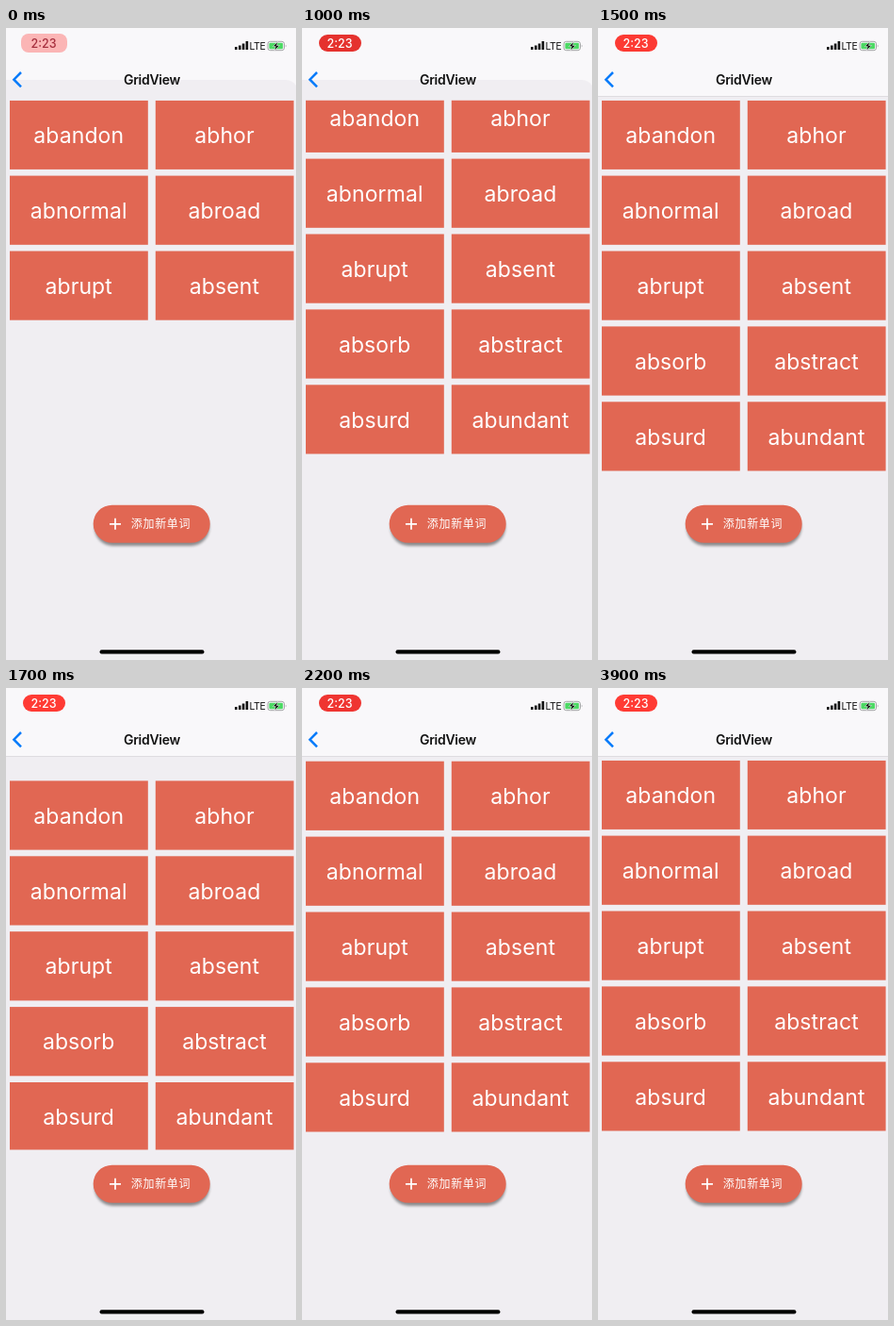
An HTML page for the animation above (4 s loop, 308 px wide and 670 px high).

```html
<!DOCTYPE html>
<html lang="zh">
<head>
<meta charset="utf-8">
<title>GridView</title>
<style>
html, body { margin: 0; width: 100%; height: 100%; overflow: hidden; background: #f0eef2; }
svg { display: block; width: 308px; height: 670px; font-family: Inter, "Noto Sans CJK SC", "Noto Sans CJK", sans-serif; }
text { text-anchor: middle; }
.card rect { fill: #e16753; }
.card text { fill: #fff; font-size: 23px; letter-spacing: .1px; }
.title { font-size: 14px; font-weight: 600; letter-spacing: -.25px; fill: #111; }
.add { font: 500 12px "Noto Sans CJK SC", "Noto Sans CJK", sans-serif; letter-spacing: .7px; fill: #fff; }
</style>
</head>
<body>
<svg viewBox="0 0 308 670">
  <defs>
    <clipPath id="view"><rect y="76.7" width="308" height="412.8"/></clipPath>
    <filter id="soft" x="-20%" y="-30%" width="140%" height="180%"><feGaussianBlur stdDeviation="1.8"/></filter>
  </defs>
  <rect width="308" height="670" fill="#f0eef2"/>
  <path id="bar" fill="#f9f8fa"/>
  <rect id="rule" y="72" width="308" height="1" fill="#dedce0"/>

  <rect id="pill"/>
  <text id="clock" x="40" y="20.5" font-size="12.5" font-weight="500">2:23</text>
  <path d="M243 20h2.6v3h-2.6zM247 18.4h2.6v4.6h-2.6zM250.8 16.4h2.6v6.6h-2.6zM254.6 14h2.6v9h-2.6z" fill="#111"/>
  <text x="267" y="22.8" font-size="10.5" letter-spacing="-.3" fill="#111">LTE</text>
  <rect x="278" y="14.3" width="17.5" height="9.4" rx="2.6" fill="none" stroke="#9b9b9d" stroke-width=".9"/>
  <rect x="279.4" y="15.7" width="14.7" height="6.6" rx="1.4" fill="#4cd964"/>
  <path d="M296.8 17.4q1.8 1.6 0 3.2z" fill="#9b9b9d"/>
  <path d="M288.6 14.4l-5.2 5.2h2.9l-1.2 4.4 5.4-5.5h-3z" fill="#111" stroke="#fff" stroke-width=".5"/>

  <path d="M16 47l-7.6 7.7 7.6 7.7" fill="none" stroke="#087bfa" stroke-width="2.5"/>
  <text class="title" x="155" y="59.5">GridView</text>

  <g clip-path="url(#view)"><g id="list"></g></g>

  <rect x="94" y="510" width="122" height="39" rx="19.5" fill="#000" opacity=".42" filter="url(#soft)"/>
  <rect id="button" x="92.7" y="505.7" width="124" height="40" rx="20"/>
  <path d="M110 525.8h12M116 519.8v12" stroke="#fff" stroke-width="1.7"/>
  <text class="add" x="164.5" y="530.2">添加新单词</text>
  <rect x="99.5" y="659.3" width="111" height="4.2" rx="2.1" fill="#000"/>
</svg>
<script>
const LOOP = 4000, STEP = 100;
const words = ["abandon", "abhor", "abnormal", "abroad", "abrupt",
  "absent", "absorb", "abstract", "absurd", "abundant"];
const flips = [
  { card: 4, text: "突然的", from: 2600, to: 3200 },
  { card: 3, text: "在国外", from: 3400, to: 3800 }
];
const presses = [[100, 300], [600, 800]];
const rowTimes = [0, 0, 0, 300, 800];
const scroll = [[900, 0], [1000, -18], [1100, -47], [1200, -65], [1300, -58], [1400, -28],
  [1500, 0], [1600, 15], [1700, 21.7], [1800, 18], [1900, 10], [2000, 5], [2200, 1], [2400, 0]];

const $ = id => document.getElementById(id);
const set = (el, attrs) => {
  for (const key in attrs) el.setAttribute(key, attrs[key]);
  return el;
};
const add = (parent, tag, attrs) =>
  parent.appendChild(set(document.createElementNS("http://www.w3.org/2000/svg", tag), attrs));
const within = (t, from, to) => t >= from && t < to;

const cards = words.map((word, i) => {
  const x = i % 2 ? 158.8 : 4, y = 76.7 + 79.9 * (i >> 1);
  const group = add($("list"), "g", { class: "card" });
  add(group, "rect", { x, y, width: 146.8, height: 73.2 });
  const label = add(group, "text", { x: x + 73.2, y: y + 45.3 });
  return { group, label };
});

function track(keys, t) {
  if (t <= keys[0][0]) return keys[0][1];
  const i = keys.findIndex(key => key[0] >= t);
  if (i < 0) return keys[keys.length - 1][1];
  const [t0, v0] = keys[i - 1], [t1, v1] = keys[i];
  return v0 + (v1 - v0) * (t - t0) / (t1 - t0);
}

function drawStatus(t) {
  const faded = t < STEP;
  const glow = (1 + Math.cos((t - 1700) / 2200 * 2 * Math.PI)) / 2;
  const mix = (a, b) => Math.round(a + (b - a) * glow);
  set($("pill"), faded
    ? { x: 16, y: 6, width: 49, height: 20, rx: 8, fill: "#fbb5b5" }
    : { x: 18, y: 7, width: 45, height: 18, rx: 9, fill: `rgb(${mix(218, 255)},${mix(46, 59)},${mix(44, 52)})` });
  set($("clock"), { fill: faded ? "#a52e3d" : "#fff" });
}

function draw(t) {
  drawStatus(t);
  const solid = t >= 1300;
  set($("bar"), { d: solid ? "M0 0H308V72H0z" : "M0 0H308V61Q305 56 298 55H0z" });
  set($("rule"), { opacity: solid ? 1 : 0 });
  set($("list"), { transform: `translate(0 ${track(scroll, t)})` });
  cards.forEach(({ group, label }, i) => {
    set(group, { visibility: t >= rowTimes[i >> 1] ? "visible" : "hidden" });
    const flip = flips.find(f => f.card === i && within(t, f.from, f.to));
    label.textContent = flip ? flip.text : words[i];
  });
  const pressed = presses.some(([from, to]) => within(t, from, to));
  set($("button"), { fill: pressed ? "#df7768" : "#e16753" });
}

const start = performance.now();
function tick() {
  const t = (performance.now() - start) % LOOP;
  draw(Math.floor(t / STEP) * STEP);
  requestAnimationFrame(tick);
}
tick();
</script>
</body>
</html>
```
